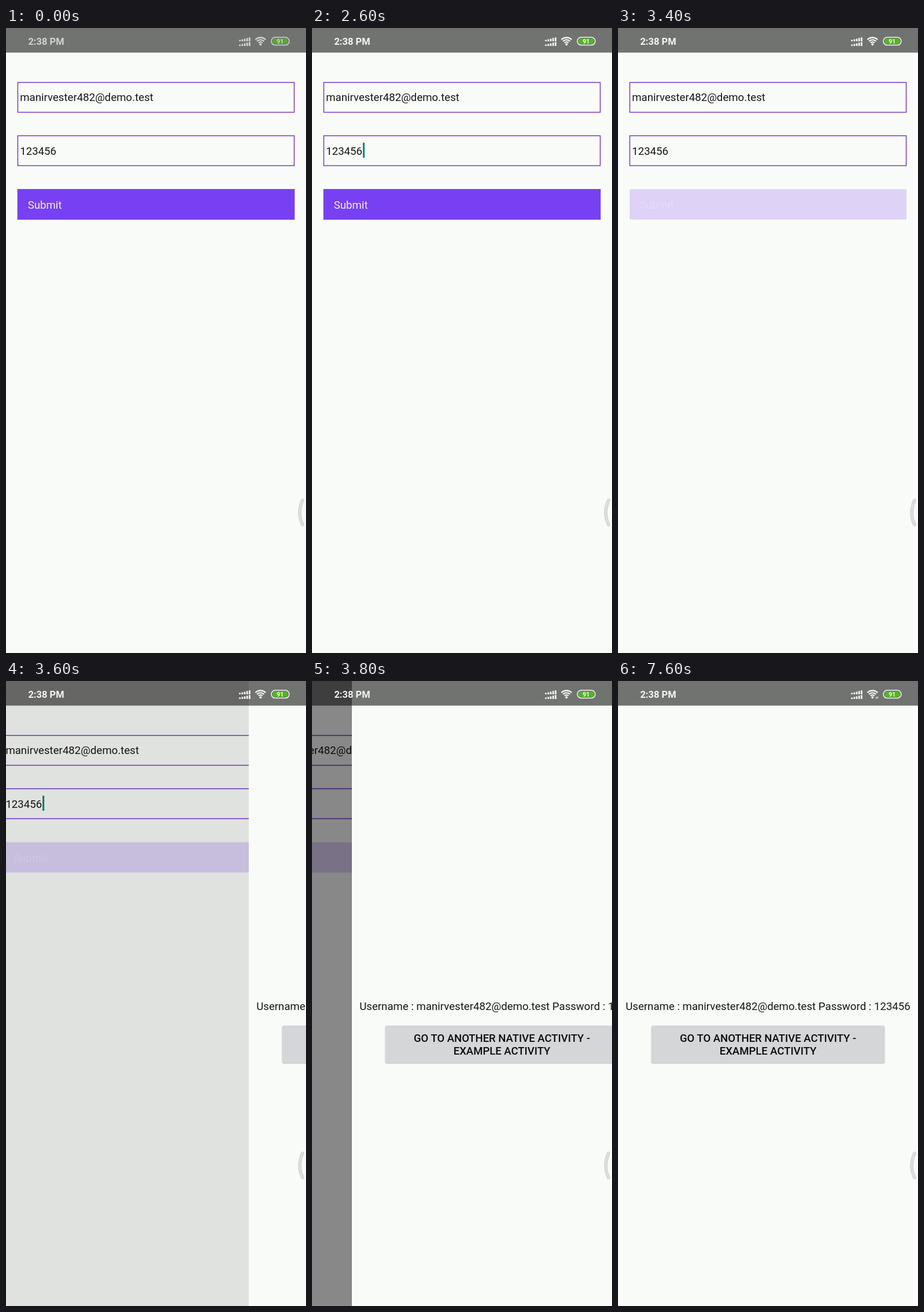
These frames come from a looping animation (519 by 1079 pixels, 8000 ms). An HTML page:

```html
<!DOCTYPE html>
<html lang="en">
<head>
<meta charset="utf-8">
<title>Login form</title>
<style>
html, body { margin: 0; width: 100%; height: 100%; overflow: hidden; background: #f9fbf8; }
svg { display: block; }
text { font: 18.65px Roboto, sans-serif; fill: #161616; white-space: pre; }
.field { fill: none; stroke: #7439d8; stroke-width: 1.5; }
#submit rect { fill: #7840f3; stroke: #6b3dd0; stroke-width: .8; }
#submit text { fill: #f3effd; }
#submit.pressed rect { fill: #ded2f6; stroke: none; }
#submit.pressed text { fill: #e6dcf9; }
#go rect { fill: #d5d6d8; filter: drop-shadow(0 1.5px 1.2px rgba(0, 0, 0, .3)); }
#go text { font-size: 18.5px; font-weight: 500; fill: #0c0c0c; text-anchor: middle; }
#status text { font-weight: 700; fill: #fff; }
#status .clock { font-size: 16.5px; }
#status .level { font-size: 10.5px; text-anchor: middle; }
.line { fill: none; stroke: #fff; }
</style>
</head>
<body>
<svg width="519" height="1079" viewBox="0 0 519 1079">
  <defs>
    <g id="sheet">
      <rect width="519" height="1079" fill="#f9fbf8"/>
      <rect width="519" height="42.5" fill="#717370"/>
    </g>
  </defs>

  <g id="login">
    <use href="#sheet"/>
    <rect class="field" x="20.4" y="94" width="478.2" height="51.5"/>
    <text class="mail" x="24.2" y="126"></text>
    <rect class="field" x="20.4" y="186" width="478.2" height="51.6"/>
    <text x="24.2" y="218.5">123456</text>
    <rect id="caret" x="88" y="198" width="3" height="26" fill="#0c8577"/>
    <g id="submit">
      <rect x="20.1" y="278.4" width="478.9" height="52.2"/>
      <text x="37.7" y="312">Submit</text>
    </g>
  </g>

  <rect id="dim" width="519" height="1079"/>

  <g id="details">
    <use href="#sheet"/>
    <text x="259.5" y="568.3" text-anchor="middle">Username : <tspan class="mail"></tspan> Password : 123456</text>
    <g id="go">
      <rect x="58" y="595" width="403" height="64" rx="2.5"/>
      <text x="259.5" y="623.4">GO TO ANOTHER NATIVE ACTIVITY -</text>
      <text x="259.5" y="645.2">EXAMPLE ACTIVITY</text>
    </g>
  </g>

  <g id="status">
    <text class="clock" x="38.4" y="28.8">2:38 PM</text>
    <path id="bars" fill="#fff"/>
    <path id="wifi" class="line" stroke-width="2.3"/>
    <circle cx="440.3" cy="28.3" r="2" fill="#fff"/>
    <path id="traffic" class="line" stroke-width=".9" d="M446.8 27v3.6m-1-1.2l1 1.2l1-1.2M449.4 30.6V27m-1 1.2l1-1.2l1 1.2"/>
    <rect class="line" x="459" y="16" width="31" height="13.6" rx="6.8" stroke-width="1.5"/>
    <rect id="charge" x="461.3" y="18.2" width="26.4" height="9.2" rx="3.6" fill="#4dbf16"/>
    <text class="level" x="474.3" y="26.6">91</text>
  </g>

  <path d="M513 815.3Q503.5 837 513 857.4" fill="none" stroke="#c9cbc8" stroke-width="5.6" stroke-linecap="round"/>
  <path d="M513 815.3Q503.5 837 513 857.4" fill="none" stroke="#dddfdc" stroke-width="3.8" stroke-linecap="round"/>
</svg>
<script>
const LOOP = 8000, STEP = 100, WIDTH = 519, SLIDE_AT = 3600, SLIDE_END = 4100;
const $ = id => document.getElementById(id);
const show = (id, on) => $(id).setAttribute('visibility', on ? 'visible' : 'hidden');

document.querySelectorAll('.mail').forEach(el => el.textContent = 'manirvester482@demo.test');

// Two rows of five rising signal bars
let bars = '';
for (const base of [23, 31])
  for (let i = 0; i < 5; i++) {
    const h = 2.4 + i * 1.1;
    bars += `M${403.2 + i * 4.2} ${base - h}h2.8v${h}h-2.8z`;
  }
$('bars').setAttribute('d', bars);

$('wifi').setAttribute('d', [12.5, 8.6, 4.8].map(r => {
  const d = r * Math.SQRT1_2;
  return `M${440.3 - d} ${29 - d}A${r} ${r} 0 0 1 ${440.3 + d} ${29 - d}`;
}).join(''));

function caretOn(t) {
  if (t < 1100) return t >= 500 && t < 1000;
  return Math.floor((t - 1100) / 500) % 2 === 1 || t >= SLIDE_AT;
}

// Critically damped slide; returns the share of the way still to go
function remaining(t) {
  if (t < SLIDE_AT) return 1;
  if (t >= SLIDE_END) return 0;
  const k = .8 + 1.36 * (t - SLIDE_AT) / 100;
  return (1 + k) * Math.exp(-k);
}

function draw(now) {
  const t = Math.floor(now % LOOP / STEP) * STEP;
  const rest = remaining(t), done = 1 - rest;
  const glow = Math.min(1, Math.max(0, (t - 200) / 800));

  $('login').setAttribute('transform', `translate(${-done * WIDTH / 4})`);
  $('details').setAttribute('transform', `translate(${Math.round(rest * WIDTH)})`);
  $('dim').setAttribute('opacity', done * .53);
  $('status').setAttribute('opacity', .68 + .24 * glow);
  $('submit').classList.toggle('pressed', t >= 3400);
  show('caret', caretOn(t));
  show('traffic', t >= 7600);
  requestAnimationFrame(draw);
}
draw(0);
</script>
</body>
</html>
```
